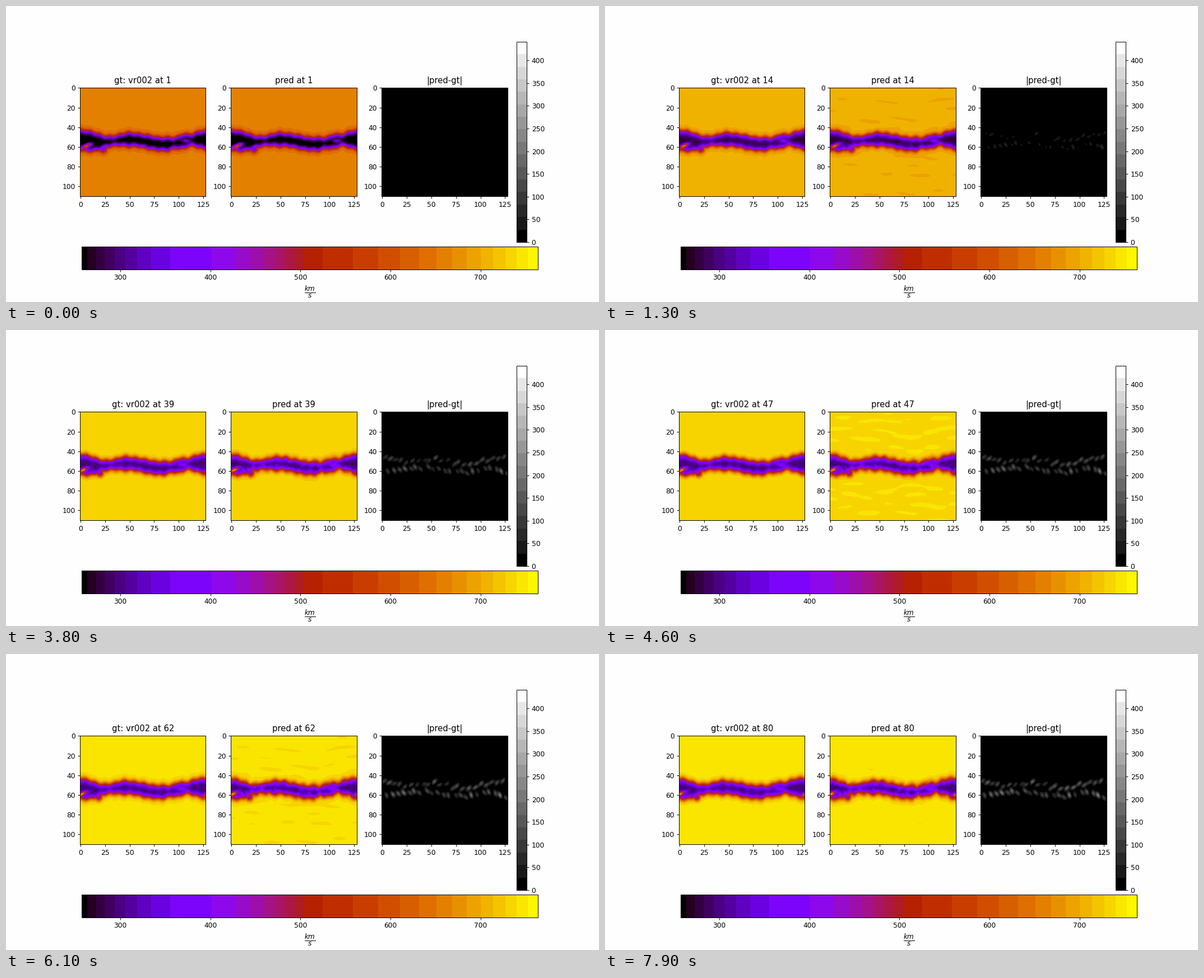
Animation of 1058x529 px, one loop 8000 ms. Source, as a matplotlib script:

```python
import numpy as np
import matplotlib.pyplot as plt
from matplotlib.animation import FuncAnimation
from matplotlib.colors import ListedColormap

W, H, STEPS = 128, 111, 80
TAU = 2 * np.pi
VMIN, VMAX, ERR_MAX = 257.2, 763.9, 441
X = np.arange(W)[None, :]
Y = np.arange(H)[:, None]

# Half width of the slow stream at evenly spaced longitudes
HALF = [9.8, 10.3, 8.8, 5.8, 4.6, 5.2, 7, 6.2,
        6.5, 6.8, 6.3, 6.8, 5, 7.3, 5, 7.8]


def speed_map(bands=30):
    """Cut gnuplot into bands of equal colour change, green counting double."""
    size = 1630
    rgba = plt.get_cmap("gnuplot").resampled(size)(np.arange(size))
    change = np.diff(rgba[:, :3], axis=0) * (1, 2, 1)
    length = np.append(0, np.cumsum(np.linalg.norm(change, axis=1)))
    band = np.minimum(length / length[-1] * bands, bands - 0.01).astype(int)
    tones = np.array([rgba[band == k].mean(axis=0) for k in range(bands)])
    tones[0, :3] = 0
    return ListedColormap(tones[band])


def gray_map():
    level = (np.arange(16) + 0.5) / 16
    level[0], level[-1] = 0, 1
    return ListedColormap(np.repeat(level[:, None], 3, axis=1))


def drift(n):
    return 0.258 * (n - 1) ** 0.7


def background(n):
    return 740.8 - 86 * np.exp(-0.063 * (n - 1)) + 0.08 * (n - 1)


def blob(x, y, x0, y0, length, width, tilt=0):
    dx = (x - x0 + W / 2) % W - W / 2
    dy = y - y0
    c, s = np.cos(np.radians(tilt)), np.sin(np.radians(tilt))
    return np.exp(-((dx * c + dy * s) / length) ** 2
                  - ((dy * c - dx * s) / width) ** 2)


def centre(x):
    a = TAU * (x - 85) / W
    return 54.65 + 1.1 * np.cos(a) + 1.75 * np.cos(2 * a)


def half_width(x):
    knots = np.arange(len(HALF)) * W / len(HALF)
    smooth = np.mean([np.interp(x + d, knots, HALF, period=W)
                      for d in np.linspace(-2.5, 2.5, 9)], axis=0)
    return smooth + 0.5 * np.cos(TAU * 13 * x / W)


def stream(n, x, y):
    """Speed at step n; x moves with the stream."""
    offset, half = y - centre(x), half_width(x)
    ramp = 2.6 + 0.006 * n
    slow = (1 + np.tanh((half + offset) / ramp)) / 2
    slow = slow * (1 + np.tanh((half - offset) / ramp)) / 2
    slow = np.maximum(slow, 0.85 * blob(x, y, 23, 62, 3.6, 4))
    slow = slow * (1 - 0.88 * blob(x, y, 6, 59.5, 5, 1.8, -25))
    slow = slow * (1 - 0.25 * blob(x, y, 107, 54, 4, 1.8))
    core = 246 + 48 * (1 - np.exp(-(n - 1) / 12))
    core = core + 45 * np.minimum((offset / half) ** 2, 1)
    top = background(n)
    return top - (top - core) * slow


def ripples():
    rng = np.random.default_rng(4)
    total = 0
    for _ in range(30):
        kx, ky = rng.uniform(-0.2, 0.2), rng.uniform(0.3, 0.8)
        total = total + np.cos(kx * X + ky * Y + rng.uniform(0, TAU))
    return 1.8 * total / total.std() - 1


def error_blobs(count=44):
    """Blobs alternating above and below the centre, strongest at the seam."""
    rng = np.random.default_rng(11)
    middle = (background(STEPS) + 300) / 2
    blobs = []
    for k in range(count):
        x = (k + rng.uniform(-0.4, 0.4)) * W / count
        side = 1 if k % 2 else -1
        y = centre(x) + side * half_width(x) * rng.uniform(0.45, 1)
        size = rng.uniform(70, 190)
        if side > 0:
            size *= 1.15 + 0.35 * np.cos(TAU * x / W)
        sign = 1 if stream(STEPS, x, y) < middle else -1
        tilt = rng.uniform(45, 75) if side > 0 else rng.uniform(-55, -25)
        blobs.append((sign * size, (x, y, 3.1, 1.7, tilt)))
    return blobs


RIPPLES, BLOBS = ripples(), error_blobs()


def panels(n):
    x = X + drift(n)
    truth = stream(n, x, Y)
    growth = 1 - np.exp(-((n - 1) / 30) ** 1.3)
    diff = growth * sum(size * blob(x, Y, *shape) for size, shape in BLOBS)
    noise = RIPPLES * (1 - np.exp(-(n - 1) / 3))
    guess = np.minimum(truth + 0.5 * diff, background(n)) + noise
    return truth, guess, np.abs(diff)


fig, axes = plt.subplots(1, 3, figsize=(12, 6), dpi=1058 / 12,
                         facecolor="#fefefe")
fig.subplots_adjust(left=0.1249, top=0.8795)
speed = dict(cmap=speed_map(), vmin=VMIN, vmax=VMAX)
gray = dict(cmap=gray_map(), vmin=0, vmax=ERR_MAX)
images = [ax.imshow(data, **style)
          for ax, data, style in zip(axes, panels(1), (speed, speed, gray))]
axes[2].set_title("|pred-gt|")

group = list(axes)
bar = fig.colorbar(images[0], ax=group, orientation="horizontal",
                   fraction=0.1, pad=0.02)
bar.set_label(r"$\frac{km}{s}$", fontsize=14)
fig.colorbar(images[2], ax=group, fraction=0.05, pad=0.02)


def draw(i):
    n = i + 1
    for image, data in zip(images, panels(n)):
        image.set_data(data)
    axes[0].set_title(f"gt: vr002 at {n}")
    axes[1].set_title(f"pred at {n}")
    return images


anim = FuncAnimation(fig, draw, frames=STEPS, init_func=lambda: draw(0),
                     interval=100, repeat=True)
plt.show()
```
